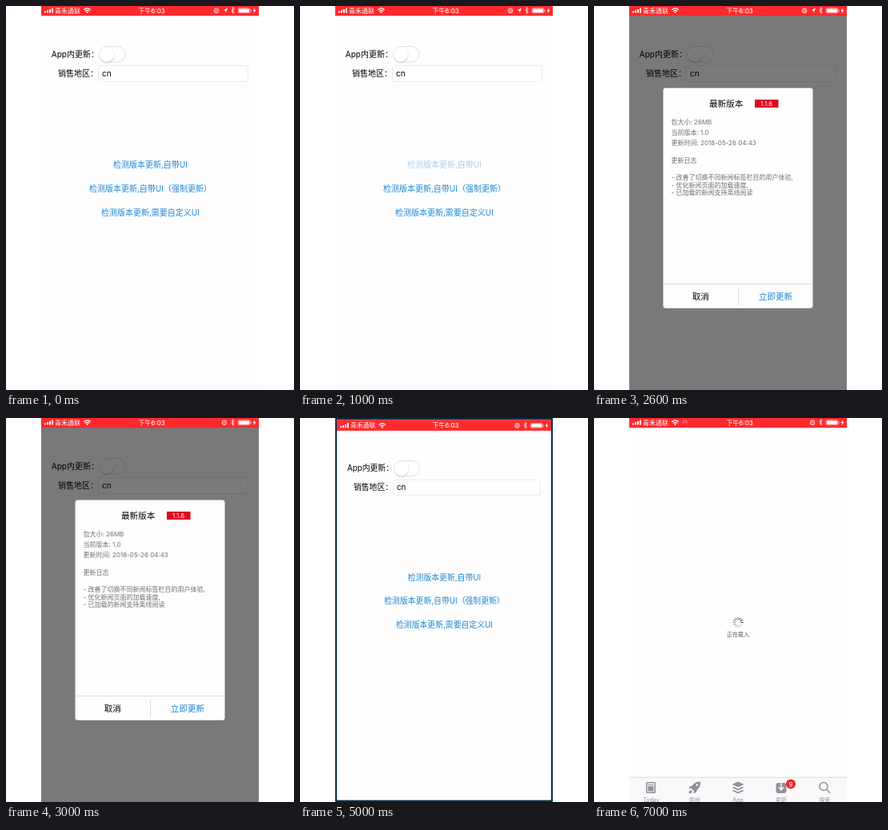
Animation of 360 by 480 pixels, one loop 8 s. Source, as an HTML page:

```html
<!DOCTYPE html>
<html lang="zh-CN">
<head>
<meta charset="utf-8">
<title>版本更新</title>
<style>
  html, body { margin: 0; width: 100%; height: 100%; overflow: hidden; background: #fff; }
  svg { display: block; width: 360px; height: 480px; font: 10px Inter, "Noto Sans CJK SC", "Noto Sans CJK", sans-serif; }
  .mid { text-anchor: middle; }
  .end { text-anchor: end; }
  .link { fill: #1b86d3; }
  .note { font-size: 8px; fill: #6e6e72; }
  .big { font-size: 10.6px; }
  .small { font-size: 7px; }
  .bar { font-size: 8px; fill: #fff; }
  .line { fill: none; stroke: #fff; stroke-width: .8; }
</style>
</head>
<body>
<svg viewBox="0 0 360 480">
  <rect id="backdrop" x="44" width="272" height="480" fill="#0b3044"/>
  <g id="phone">
    <rect x="44" y="-1.5" width="272" height="483" fill="#fefefe"/>

    <g id="home">
      <text class="end" x="116" y="63.6">App内更新：</text>
      <text class="end" x="115" y="88">销售地区：</text>
      <rect x="116.5" y="50.5" width="32.5" height="19.5" rx="9.75" fill="#fff" stroke="#e0e0e0"/>
      <circle cx="126" cy="62" r="9.4" fill="#d9d9d9"/>
      <circle cx="126" cy="60.2" r="9.5" fill="#fff" stroke="#e2e2e2" stroke-width=".6"/>
      <rect x="115.5" y="74.5" width="187" height="20" rx="3" fill="#fff" stroke="#ebebeb"/>
      <text x="120" y="88">cn</text>
      <g class="link mid">
        <text id="first" x="180.5" y="202">检测版本更新,自带UI</text>
        <text x="180.5" y="232">检测版本更新,自带UI（强制更新）</text>
        <text x="180.5" y="262">检测版本更新,需要自定义UI</text>
      </g>
    </g>

    <rect id="dim" x="44" width="272" height="480" opacity=".52"/>

    <g id="store">
      <rect x="44" y="449" width="272" height="33" fill="#fbf8fb"/>
      <path d="M44 449.2H316" stroke="#d8d6d9" stroke-width=".9"/>
      <path id="edge" d="M315.3 13V481" stroke="#dddde2" stroke-width=".8"/>
      <g id="loaded">
        <g id="wheel" stroke="#444"></g>
        <text class="small mid" x="180" y="273.4" fill="#555">正在载入</text>
        <g fill="#929296">
          <path fill-rule="evenodd" d="M66.5 455h9a1.5 1.5 0 0 1 1.5 1.5v11a1.5 1.5 0 0 1-1.5 1.5h-9a1.5 1.5 0 0 1-1.5-1.5v-11a1.5 1.5 0 0 1 1.5-1.5zM66.5 456.5v11h9v-11z"/>
          <path d="M67.5 458h7v1.2h-7zM67.5 460.3h7v6.2h-7z"/>
          <path d="M133 454.5q-7 0-10 5-3 0-4.5 4l3.3-.4 3.2 3.2-.4 3.2q4-1.500 4-4.500 5-3 4.400-10.500zM121 465q-2.500 1-2.500 4.500 3.500 0 4.500-2.500z"/>
          <circle cx="128.800" cy="458.800" r="1.300" fill="#fbf8fb"/>
          <path d="M180 454.500l7.500 3.500-7.500 3.500-7.500-3.500zM172.500 462l2.200-1 5.300 2.500 5.300-2.500 2.200 1-7.500 3.500zM172.500 466l2.200-1 5.300 2.500 5.300-2.500 2.200 1-7.500 3.500z"/>
          <rect x="227.500" y="456" width="13" height="13" rx="3"/>
          <path d="M234 454v10.500M230.800 461.500l3.200 3.300 3.200-3.300" fill="none" stroke="#fbf8fb" stroke-width="1.500"/>
          <g fill="none" stroke="#929296" stroke-width="1.500">
            <circle cx="287" cy="460.500" r="5"/>
            <path d="M290.700 464.200L295 468.700"/>
          </g>
          <g class="small mid">
            <text x="71.500" y="479.700">Today</text>
            <text x="125.700" y="479.700">游戏</text>
            <text x="180" y="479.700">App</text>
            <text x="234" y="479.700">更新</text>
            <text x="288.300" y="479.700">搜索</text>
          </g>
        </g>
        <circle cx="246" cy="457.500" r="6" fill="#f5232b"/>
        <text class="bar mid" x="246" y="460.500">9</text>
      </g>
    </g>

    <g>
      <rect x="44" y="-1.5" width="272" height="13.7" fill="#ff292d"/>
      <path d="M48 6.500h2v2h-2zM51 5.300h2v3.200h-2zM54 4h2v4.500h-2zM57 2.500h2v6h-2z" fill="#fff"/>
      <text class="bar" x="61" y="8.500">青禾通联</text>
      <g class="line">
        <path d="M97.300 4.800q4.200-4 8.400 0M98.900 6.500q2.600-2.400 5.200 0" stroke-width="1.200"/>
        <path d="M101.500 6.600l1.300 1.200-1.300 1.400-1.300-1.400z" fill="#fff" stroke="none"/>
        <g id="busy"></g>
        <g id="lock">
          <circle cx="273" cy="5.700" r="2.900"/>
          <path d="M271.700 5.300h2.600v2h-2.600zM272.200 5.300v-.8q.8-1 1.600 0v.8" stroke-width=".5"/>
        </g>
        <path id="arrow" d="M277 2.500l-5.500 2.700 2.700.5.500 2.800z" fill="#fff" stroke="none"/>
        <path d="M281.500 3.700l3.800 3.800-1.900 1.800v-7.600l1.900 1.800-3.800 3.800"/>
        <rect x="290" y="2.700" width="15" height="6" rx="1.300" stroke-width=".5"/>
        <rect x="290.800" y="3.500" width="13.400" height="4.400" rx=".6" fill="#fff" stroke="none"/>
        <path d="M306 4.500v2.400"/>
        <path d="M311.500 2l-3 4.200h1.800l-.8 3.300 3-4.400h-1.800z" fill="#fff" stroke="none"/>
      </g>
      <text class="bar mid" x="182" y="8.500" font-weight="500">下午6:03</text>
    </g>
  </g>

  <g id="dialog">
    <rect x="86.500" y="102.500" width="187" height="275.300" rx="3" fill="#fefefe"/>
    <text class="big" x="144" y="126" font-weight="500">最新版本</text>
    <rect x="201" y="117" width="29.500" height="10" fill="#dc0820"/>
    <text class="bar mid" x="215.700" y="125">1.1.6</text>
    <g class="note">
      <text x="96.500" y="148.300">包大小: 26MB</text>
      <text x="96.500" y="161.300">当前版本: 1.0</text>
      <text x="96.500" y="174.300">更新时间: 2018-05-26 04:43</text>
      <text x="96.500" y="196.300">更新日志</text>
      <text x="96.500" y="217">- 改善了切换不同新闻标签栏目的用户体验,</text>
      <text x="96.500" y="226.600">- 优化新闻页面的加载速度,</text>
      <text x="96.500" y="236.200">- 已加载的新闻支持离线阅读</text>
    </g>
    <path d="M86.500 347.500H273.500M180.500 352V374" stroke="#dcdcde"/>
    <text class="big mid" x="133.300" y="367">取消</text>
    <text class="big mid link" x="227" y="367">立即更新</text>
  </g>
</svg>
<script>
  const $ = id => document.getElementById(id);
  const show = (id, on) => $(id).style.display = on ? "" : "none";

  // Ring of twelve spokes, darkest at the right
  function spokes(id, x, y, inner, outer, width) {
    for (let i = 0; i < 12; i++) {
      const fade = 1 - ((15 - i) % 12) * .07;
      $(id).innerHTML += `<path d="M0 ${-inner}V${-outer}" stroke-width="${width}" opacity="${fade}"
        transform="translate(${x} ${y}) rotate(${i * 30})"/>`;
    }
  }
  spokes("wheel", 180, 255.5, 3.4, 6.6, 1.2);
  spokes("busy", 113.5, 5.5, 1.5, 3, .5);

  const zoom = (s, dx = 0) => `translate(${180 + dx} 240) scale(${s}) translate(-180 -240)`;

  function draw(now) {
    const sec = Math.floor(now / 1000) % 8;
    const alert = sec > 1 && sec < 5;
    show("home", sec < 6);
    show("dim", alert);
    show("dialog", alert);
    show("arrow", sec < 3);
    show("backdrop", sec === 5 || sec === 6);
    show("store", sec > 5);
    show("edge", sec === 6);
    show("loaded", sec === 7);
    show("busy", sec === 7);
    $("first").setAttribute("opacity", sec === 1 ? .38 : 1);
    $("lock").setAttribute("transform", `translate(${sec < 3 ? -10 : 0} 0)`);
    $("phone").setAttribute("transform", sec === 5 ? zoom(.984) : sec === 6 ? zoom(.994, .9) : "");
  }

  const start = performance.now();
  function tick() {
    draw(performance.now() - start);
    requestAnimationFrame(tick);
  }
  tick();
</script>
</body>
</html>
```
